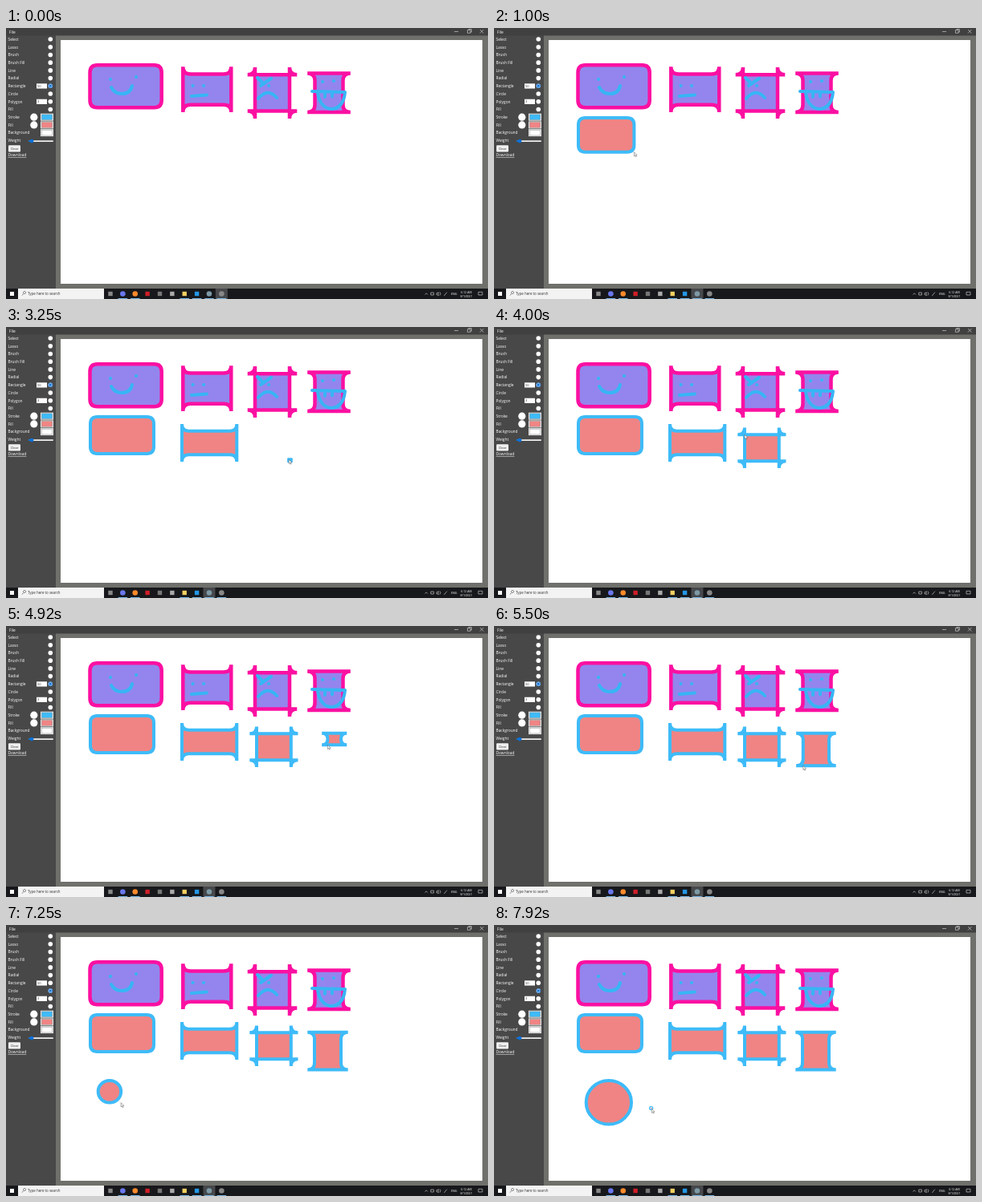
Animation, 600 px wide and 338 px high, one loop 8 s. Source, as an HTML page:

```html
<!DOCTYPE html>
<html lang="en">
<head>
<meta charset="utf-8">
<title>Drawing app</title>
<style>
  html, body { margin: 0; width: 100%; height: 100%; overflow: hidden; background: #484848; }
  svg { display: block; width: 100vw; height: 100vh; }
  text { font-family: "Open Sans", "Noto Sans", sans-serif; fill: #fff; }
  .dark { fill: #333; }
  .mid { text-anchor: middle; }
  .line { fill: none; stroke: #ddd; stroke-width: .6; }
  .brush { fill: none; stroke: #37b5f5; stroke-width: 4; stroke-linecap: round; stroke-linejoin: round; }
</style>
</head>
<body>
<svg viewBox="0 0 600 338" preserveAspectRatio="none">
  <rect width="600" height="338" fill="#484848"/>
  <rect width="600" height="9.5" fill="#404040"/>
  <rect id="hover" width="62" height="9.7" fill="#646464"/>
  <rect x="62" y="9.5" width="538" height="316" fill="#6f706b"/>
  <rect x="68" y="15" width="525" height="304" fill="#fff"/>
  <path class="line" d="M558 4.5h5M574.5 2.7h3.6v3.6h-3.6zM575.8 2.7v-1.2h3.6v3.6h-1.2M590 2l4.5 4.5M594.5 2l-4.5 4.5"/>
  <g id="panel"></g>
  <g id="samples" fill="#9485ee" stroke="#fb10a2" stroke-width="4.5"></g>
  <g class="brush">
    <path d="M130 64h.1M162 61h.1M131 74Q135 82 144 82Q155 82 157 72"/>
    <path d="M232.5 72h.1M246 72h.1M231 85L250 83.5"/>
    <path d="M313 62L319 68M330 63L317 72M327 72h.1M314 88Q326 74 337 87"/>
    <path d="M394 67h.1M408 66h.1M381 79L422 80Q420 101 404 101Q391 99 388 81M397 80v6M406 80v5.5"/>
  </g>
  <g id="drawn" fill="#f08484" stroke="#3ebbf8" stroke-width="4"></g>
  <rect y="325" width="600" height="13" fill="#17181b"/>
  <rect x="15" y="325" width="107" height="13" fill="#f3f3f3"/>
  <rect id="active" y="325" width="15" height="13" fill="#46484b"/>
  <g id="taskbar"></g>
  <path id="cursor" d="M0 0V5.2L1.2 4.1L2 6L2.9 5.6L2.1 3.8H3.7Z" fill="#fff" stroke="#444" stroke-width=".45"/>
</svg>
<script>
const $ = id => document.getElementById(id);
const BLUE = '#0b6fd6', ROW = 9.72, TOP = 14;
const rowY = i => TOP + i * ROW;

const text = (x, y, s, size = 4.85, extra = '') =>
  `<text x="${x}" y="${y}" font-size="${size}" ${extra}>${s}</text>`;
const rect = (x, y, w, h, fill, extra = '') =>
  `<rect x="${x}" y="${y}" width="${w}" height="${h}" fill="${fill}" ${extra}/>`;
const circle = (x, y, r, fill, extra = '') =>
  `<circle cx="${x}" cy="${y}" r="${r}" fill="${fill}" ${extra}/>`;
const line = d => `<path class="line" d="${d}"/>`;

// Side panel
const tools = ['Select', 'Lasso', 'Brush', 'Brush Fill', 'Line', 'Radial', 'Rectangle', 'Circle', 'Polygon', 'Fill'];
const swatches = [['Stroke', '#3ebbf8'], ['Fill', '#f08484'], ['Background', '#fff']];
const label = (i, s) => text(2.5, rowY(i) + 1.8, s);
const field = (i, s) => rect(38, rowY(i) - 3, 13, 6.2, '#fff') + text(39, rowY(i) + 1.5, s, 4, 'class="dark"');

$('panel').innerHTML = text(4, 6.6, 'File') +
  tools.map((s, i) => label(i, s) + circle(55.3, rowY(i), 2.8, '#fff')).join('') +
  `<g id="radio">${circle(55.3, 0, 2.4, '#fff', `stroke="${BLUE}" stroke-width=".9"`)}${circle(55.3, 0, 1.5, BLUE)}</g>` +
  field(6, '50') + field(8, '3') +
  swatches.map(([s, color], i) => {
    const y = rowY(10 + i);
    return label(10 + i, s) + (i < 2 ? circle(34.8, y, 4.6, '#fff') : '') +
      rect(43, y - 4.5, 16, 9, '#e6e6e6') +
      rect(44.3, y - 3.3, 13.4, 6.6, color, 'stroke="#888" stroke-width=".4"');
  }).join('') +
  label(13, 'Weight') + rect(28, 140.2, 31, 1.8, '#eee', 'rx=".9"') +
  rect(28, 140.2, 4, 1.8, BLUE) + circle(32, 141.1, 2.4, BLUE) +
  rect(3, 146.2, 15, 8.4, '#efefef', 'rx="1"') + text(10.5, 152, 'Clear', 4, 'class="dark mid"') +
  text(2.5, 160.3, 'Download', 4.85, 'text-decoration="underline"');

// Taskbar: evenly spaced icons, round or square, some with a running mark
const icons = [
  ['#888'], ['#6a78ee', 1, 1], ['#ff8a2a', 1, 1], ['#d01e28'], ['#777'],
  ['#aaa'], ['#f4cf62', 0, 1], ['#2497e6', 0, 1], ['#7d9aa6', 1, 1], ['#888', 1, 1]
];
const iconX = i => 130 + i * 15.37;
$('taskbar').innerHTML = rect(5, 329, 5, 5, '#fff') +
  `<path d="M21.8 331.4L20 333.6M22 331a1.5 1.5 0 1 1 .1 .1" fill="none" stroke="#333" stroke-width=".6"/>` +
  text(27, 333.2, 'Type here to search', 4.45, 'class="dark"') +
  icons.map(([color, round, running], i) => {
    const x = iconX(i);
    return (round ? circle(x, 331.5, 3.3, color) : rect(x - 2.7, 328.8, 5.4, 5.4, color)) +
      (running ? rect(x - 5.8, 337, 11.6, 1, '#79b8e8') : '');
  }).join('') +
  line('M521.5 332.5l1.7-1.7l1.7 1.7M528.8 330h3.6v3h-3.6zM536 330.7h1l1.2-1.2v4.4l-1.2-1.2h-1zM540 329.5q2 2 0 4M545.3 334l3.6-4.4M588 329.3h5v3.7h-5z') +
  text(554, 333, 'ENG', 3.7) +
  text(573, 330.5, '6:12 AM', 3.6, 'class="mid"') +
  text(573, 336, '8/1/2021', 3.6, 'class="mid"');

// Rounded rectangle; dragging backwards turns its corners outwards
function roundRect([x, y], [x2, y2], max = 8.7) {
  const r = Math.min(max, Math.abs(x2 - x) / 2, Math.abs(y2 - y) / 2);
  return `M${x + r} ${y}L${x2 - r} ${y}Q${x2} ${y} ${x2} ${y + r}L${x2} ${y2 - r}Q${x2} ${y2} ${x2 - r} ${y2}` +
    `L${x + r} ${y2}Q${x} ${y2} ${x} ${y2 - r}L${x} ${y + r}Q${x} ${y} ${x + r} ${y}Z`;
}
function ellipse([x, y], [x2, y2]) {
  const w = x2 - x, rx = Math.abs(w) / 2, ry = Math.abs(y2 - y) / 2;
  return `M${x} ${(y + y2) / 2}a${rx} ${ry} 0 1 1 ${w} 0a${rx} ${ry} 0 1 1 ${-w} 0Z`;
}

$('samples').innerHTML = [
  [[104.5, 46.2], [193.7, 99.2]],
  [[220.3, 95.8], [280.3, 57.6]],
  [[353, 103.6], [310, 58.2]],
  [[419.5, 56.5], [384.5, 105]]
].map(([a, b]) => `<path d="${roundRect(a, b, 9.3)}"/>`).join('');

// Pointer moves: start and end time, start and end point, slow-down in x and y, outline drawn
const FOCUS = 790, CLICK = 6450;
const moves = [
  [80, 500, [268, 326], [150, 170], [1, 1]],
  [FOCUS, 1420, [105, 112], [184, 158], [5.2, 6.5], roundRect],
  [1667, 2417, [219, 159.3], [287.3, 129.8], [1.6, 1.6], roundRect],
  [3200, 4000, [354.8, 167.3], [312, 134.3], [1, 1], roundRect],
  [4667, 5800, [417, 133.8], [384, 180.5], [2.8, 1.5], roundRect],
  [6330, 6500, [56.5, 81], [56, 82], [1, 1]],
  [7000, 7667, [114.7, 194], [171, 248.6], [1.5, 1.5], ellipse],
  [7850, 8000, [195, 227.8], [198, 230.5], [1, 1], ellipse]
];
const clamp = k => Math.min(1, Math.max(0, k));
const smooth = k => k * k * (3 - 2 * k);

function along([t0, t1, a, b, slow], t) {
  const k = clamp((t - t0) / (t1 - t0));
  return a.map((v, i) => v + (b[i] - v) * (1 - (1 - k) ** slow[i]));
}
function pointer(t) {
  const next = moves.findIndex(m => m[0] > t);
  if (next == 0) return moves[0][2];
  const move = moves.at(next < 0 ? -1 : next - 1);
  if (t <= move[1]) return along(move, t);
  const [start, , goal] = moves[next];
  const k = smooth((t - move[1]) / (start - move[1]));
  return move[3].map((v, i) => v + (goal[i] - v) * k);
}

const drags = moves.filter(m => m[5]);
$('drawn').innerHTML = '<path/>'.repeat(drags.length);

const LOOP = 8000, STEP = 1000 / 12;
function draw(now) {
  const t = Math.floor((now % LOOP + 4) / STEP) * STEP % LOOP;
  const [x, y] = pointer(t);
  drags.forEach((m, i) =>
    $('drawn').children[i].setAttribute('d', t > m[0] ? m[5](m[2], along(m, t)) : ''));
  $('cursor').setAttribute('transform', `translate(${x} ${y})`);
  $('cursor').style.display = t < moves[0][0] ? 'none' : '';
  const row = Math.round((y - TOP) / ROW);
  $('hover').setAttribute('y', rowY(row) - ROW / 2);
  $('hover').style.display = x < 62 && row < tools.length ? '' : 'none';
  $('radio').setAttribute('transform', `translate(0 ${rowY(t < CLICK ? 6 : 7)})`);
  $('active').setAttribute('x', iconX(t < FOCUS ? 9 : 8) - 7.5);
}
let start;
function tick(now) {
  start ??= now;
  draw(now - start);
  requestAnimationFrame(tick);
}
draw(0);
requestAnimationFrame(tick);
</script>
</body>
</html>
```
